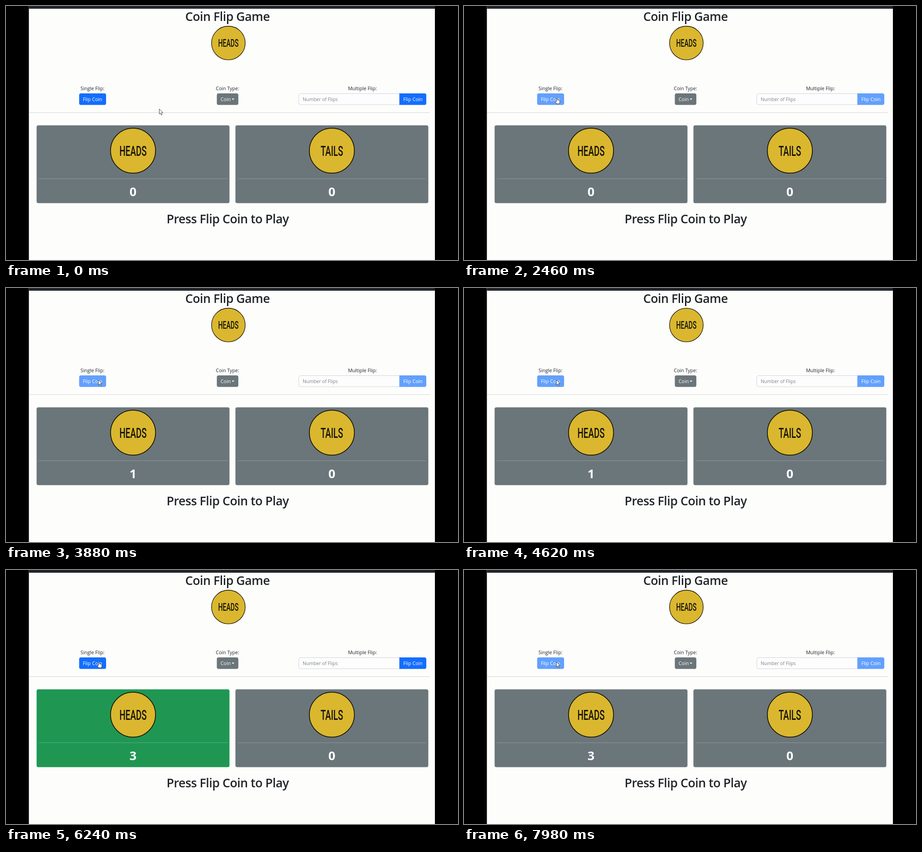
An HTML page with a canvas for the animation above (8000 ms loop, 998 by 561 pixels).

```html
<!DOCTYPE html>
<html lang="en">
<head>
<meta charset="utf-8">
<title>Coin Flip Game</title>
<style>
  html, body { margin: 0; width: 100%; height: 100%; overflow: hidden; background: #000; }
  canvas { display: block; width: 998px; height: 561px; }
</style>
</head>
<body>
<canvas id="stage" width="998" height="561"></canvas>
<script>
const ctx = document.getElementById('stage').getContext('2d');
const LOOP = 8000;
const FLIP_TIME = 890;
const TURNS = 3;
const FADE = 150;
const CURSOR_LAG = 40;
const CLICKS = [2440, 3820, 5320, 7110];
const MOVE = { from: [338.5, 227.5], to: [204, 203], start: 500, end: 1380 };

const SANS = '"Open Sans", "Noto Sans", sans-serif';
const BLUE = [20, 110, 252], HOVER = [17, 94, 212];
const DISABLED = 'rgb(99,160,252)';
const GREY = '#6b767a', GREEN = '#1f9753', INK = '#212529';

const clamp = v => Math.max(0, Math.min(1, v));
const ease = v => v < 0.5 ? 4 * v ** 3 : 1 - 4 * (1 - v) ** 3;
const mix = (a, b, k) => `rgb(${a.map((v, i) => Math.round(v + (b[i] - v) * k)).join(',')})`;

function text(str, x, y, size, { weight = 400, color = INK, align = 'center', spacing = 0 } = {}) {
  ctx.font = `${weight} ${size}px ${SANS}`;
  ctx.letterSpacing = spacing + 'px';
  ctx.textAlign = align;
  ctx.fillStyle = color;
  ctx.fillText(str, x, y);
  ctx.letterSpacing = '0px';
}

function box(x, y, w, h, radius, fill, stroke) {
  ctx.beginPath();
  ctx.roundRect(x, y, w, h, radius);
  ctx.fillStyle = fill;
  ctx.fill();
  if (stroke) {
    ctx.strokeStyle = stroke;
    ctx.lineWidth = 1;
    ctx.stroke();
  }
}

function rule(x1, x2, y, color) {
  ctx.fillStyle = color;
  ctx.fillRect(x1, y, x2 - x1, 1);
}

function coin(x, y, r, face, tilt = 1) {
  ctx.save();
  ctx.translate(x, y);
  ctx.scale(1, Math.max(0.02, tilt));
  ctx.beginPath();
  ctx.arc(0, 0, r, 0, Math.PI * 2);
  ctx.fillStyle = '#dab72e';
  ctx.fill();
  ctx.lineWidth = r * 0.035;
  ctx.strokeStyle = '#15130a';
  ctx.stroke();
  // condensed lettering
  ctx.scale(0.6, 1);
  ctx.font = `500 ${r * 0.63}px Roboto, sans-serif`;
  ctx.textAlign = 'center';
  ctx.fillStyle = '#15130a';
  ctx.fillText(face, 0, r * 0.225);
  ctx.restore();
}

function spinningCoin(x, y, r, progress) {
  const c = Math.cos(ease(progress) * TURNS * Math.PI * 2);
  coin(x, y, r, c < 0 ? 'TAILS' : 'HEADS', Math.abs(c));
}

function card(x, face, count, fill) {
  box(x + 0.5, 263.5, 426, 172, 4, fill, 'rgba(255,255,255,0.12)');
  coin(x + 213.5, 319.5, 49.7, face);
  rule(x + 5.5, x + 422, 381, 'rgba(255,255,255,0.25)');
  text(count, x + 213.5, 420, 27, { weight: 700, color: '#fff' });
}

function shape(points, fill, stroke) {
  ctx.beginPath();
  points.forEach(([x, y]) => ctx.lineTo(x, y));
  ctx.closePath();
  ctx.fillStyle = fill;
  ctx.fill();
  if (stroke) {
    ctx.lineWidth = 0.9;
    ctx.lineJoin = 'round';
    ctx.strokeStyle = stroke;
    ctx.stroke();
  }
}

function arrow(x, y) {
  ctx.save();
  ctx.translate(x, y);
  shape([[0, 0], [0, 11.2], [2.5, 8.9], [4.4, 13.3], [6.3, 12.5], [4.5, 8.2], [7.9, 8.1]], '#fff', '#333');
  ctx.restore();
}

function hand(x, y) {
  ctx.save();
  ctx.translate(x, y);
  ctx.beginPath();
  ctx.moveTo(0, 8.5);
  ctx.lineTo(0, 1);
  ctx.quadraticCurveTo(1, -0.8, 2.1, 1);
  ctx.lineTo(2.1, 4.6);
  ctx.quadraticCurveTo(3.4, 3.8, 4.2, 5);
  ctx.quadraticCurveTo(5.5, 4.4, 6.1, 5.5);
  ctx.quadraticCurveTo(7.6, 5.2, 7.7, 7);
  ctx.lineTo(7.4, 10.2);
  ctx.lineTo(6.4, 13);
  ctx.lineTo(1, 13);
  ctx.lineTo(-2.7, 8.6);
  ctx.quadraticCurveTo(-2.4, 6.7, 0, 8.5);
  ctx.fillStyle = '#fff';
  ctx.fill();
  ctx.lineWidth = 0.9;
  ctx.strokeStyle = '#333';
  ctx.stroke();
  ctx.restore();
}

function stateAt(t) {
  const k = ease(clamp((t - MOVE.start) / (MOVE.end - MOVE.start)));
  const [x, y] = MOVE.from.map((v, i) => v + (MOVE.to[i] - v) * k);
  const over = x < 221 && y < 218;
  const count = CLICKS.filter(c => t >= c + FLIP_TIME).length;
  const lastClick = CLICKS.filter(c => t >= c).pop();
  const since = lastClick === undefined ? -1 : t - lastClick;
  const busy = since >= 0 && since < FLIP_TIME;
  const won = since >= FLIP_TIME;

  const hover = won ? clamp((since - FLIP_TIME - CURSOR_LAG) / FADE) : Number(over);
  return {
    x, y, count, won,
    pointer: over && !(busy && since > CURSOR_LAG),
    spin: busy ? since / FLIP_TIME : 0,
    single: busy ? DISABLED : mix(BLUE, HOVER, hover),
    multi: busy ? DISABLED : mix(BLUE, HOVER, 0)
  };
}

function draw(t) {
  const s = stateAt(t);
  ctx.fillStyle = '#000';
  ctx.fillRect(0, 0, 998, 561);
  ctx.fillStyle = '#fdfdfc';
  ctx.fillRect(50.5, 0, 896.5, 561);
  ctx.fillStyle = INK;
  ctx.fillRect(50.5, 0, 896.5, 6);

  const heading = { weight: 600, spacing: -0.5 };
  text('Coin Flip Game', 489, 33, 26.8, heading);
  spinningCoin(491, 81.7, 37.2, s.spin);

  text('Single Flip:', 191, 185.5, 10.7);
  text('Coin Type:', 489, 185.5, 10.7);
  text('Multiple Flip:', 787, 185.5, 10.7);

  const label = { color: '#fff' };
  box(161.5, 193, 59.5, 25.5, 4, s.single);
  text('Flip Coin', 191, 210, 10.7, label);

  box(465.5, 193, 47.5, 25.5, 4, GREY);
  text('Coin', 485, 210, 10.7, label);
  shape([[498.3, 204.6], [504.3, 204.6], [501.3, 207.6]], '#fff');

  box(646.5, 193.5, 223, 24.5, [4, 0, 0, 4], '#fdfdfd', '#ced4da');
  text('Number of Flips', 655, 210, 10.4, { color: '#7b8288', align: 'left' });
  box(868.5, 193, 59.5, 25.5, [0, 4, 4, 0], s.multi);
  text('Flip Coin', 898.5, 210, 10.7, label);

  rule(51, 936, 235, '#d3d4d6');
  card(67, 'HEADS', s.count, s.won ? GREEN : GREY);
  card(506, 'TAILS', 0, GREY);
  text('Press Flip Coin to Play', 489.5, 480, 26.8, heading);

  if (s.pointer) hand(s.x, s.y);
  else arrow(s.x, s.y);
}

function frame() {
  draw(performance.now() % LOOP);
  requestAnimationFrame(frame);
}
frame();
</script>
</body>
</html>
```
